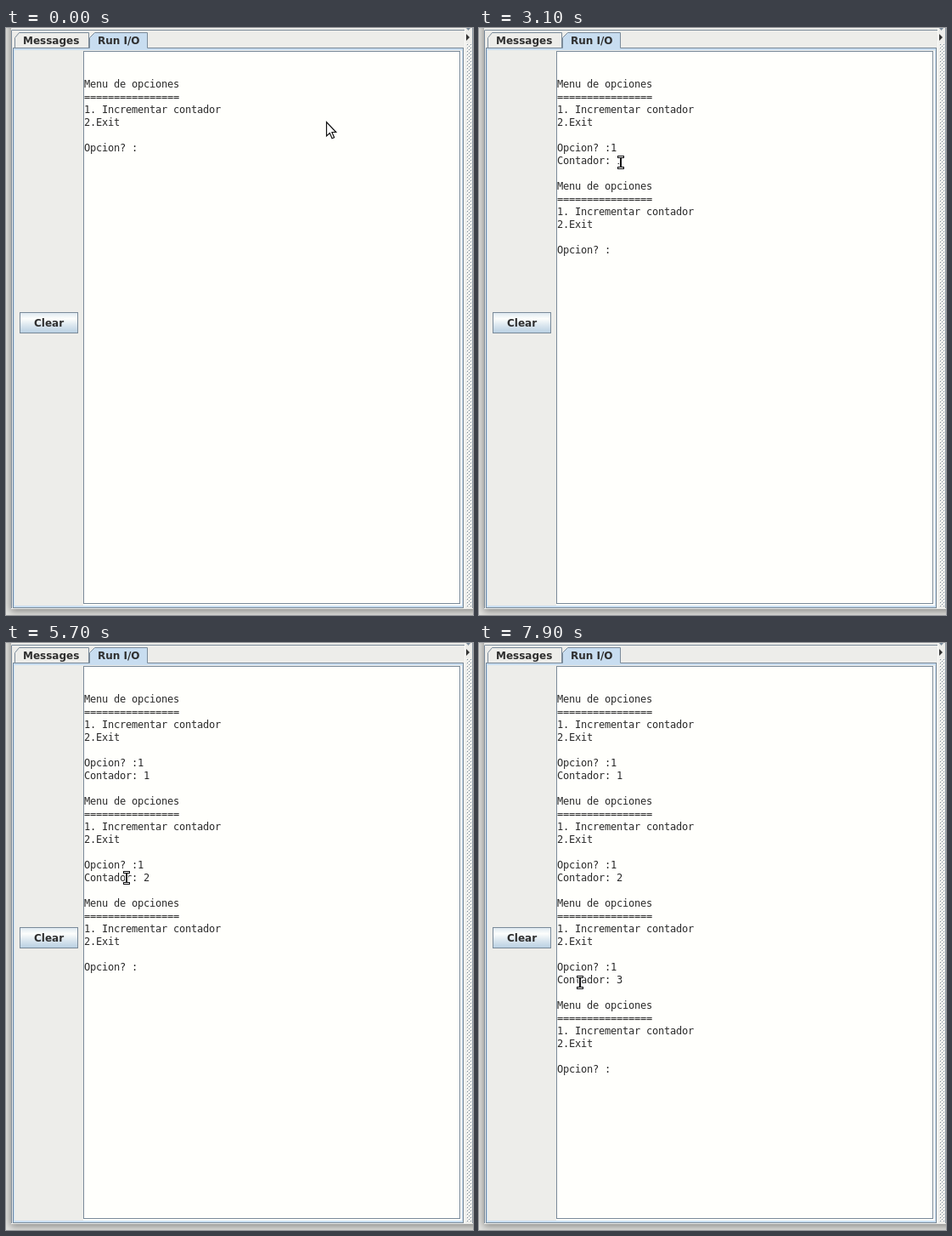
Write an HTML page that moves like this. It is 550 by 690 pixels and loops after 8000 ms.

```html
<!DOCTYPE html>
<html lang="es">
<head>
<meta charset="utf-8">
<title>Run I/O</title>
<style>
html, body { margin: 0; width: 100%; height: 100%; overflow: hidden; background: #e4e4e1; }
svg { display: block; width: 550px; height: 690px; }
.ui { font: bold 12px "DejaVu Sans", sans-serif; fill: #2f2f2f; }
.mono { font: 12px "DejaVu Sans Mono", monospace; fill: #292929; letter-spacing: calc(7px - 1ch); }
.edge { fill: none; stroke: #7a8a99; }
.crisp { shape-rendering: crispEdges; }
</style>
</head>
<body>
<svg viewBox="0 0 550 690">
  <defs>
    <linearGradient id="btn" x1="0" y1="0" x2="0" y2="1">
      <stop offset="0" stop-color="#dde8f0"/>
      <stop offset=".3" stop-color="#fdfefc"/>
      <stop offset=".6" stop-color="#dde8f0"/>
      <stop offset="1" stop-color="#b8cfe2"/>
    </linearGradient>
    <filter id="soft" filterUnits="userSpaceOnUse" x="-40" y="-80" width="680" height="800">
      <feGaussianBlur stdDeviation="5"/>
    </filter>
    <pattern id="bumps" x="542" y="18" width="4" height="4" patternUnits="userSpaceOnUse">
      <path d="M0 0h1v1h-1zM2 2h1v1h-1z" fill="#fff"/>
      <path d="M1 1h1v1h-1zM3 3h1v1h-1z" fill="#7a8a99"/>
    </pattern>
  </defs>

  <!-- window and its shadow -->
  <rect width="550" height="690" fill="#e4e4e1"/>
  <rect x="5" y="-60" width="620" height="746" fill="#000" opacity=".4" filter="url(#soft)"/>
  <rect x="6" width="544" height="683" fill="#ededea"/>
  <path d="M6.500 2.500H540M6.500 3V682" class="edge"/>

  <!-- tabs and their content frame -->
  <path d="M10.500 23V11.500L15.500 5.500H97.500V23" class="edge"/>
  <rect x="8.500" y="23.500" width="530" height="658" fill="#c8ddf0" stroke="#7a8a99"/>
  <path d="M98.500 25V11.500L104.500 5.500H166.500V25" fill="#c8ddf0"/>
  <path d="M98.500 23.500V11.500L104.500 5.500H166.500V23.500" class="edge"/>
  <path d="M8.500 24V681" stroke="#6d87a3"/>
  <rect x="10" y="26" width="527" height="653" fill="#ededea"/>
  <path d="M536 27V678H91" fill="none" stroke="#fffffc" stroke-width="2"/>
  <rect x="91.500" y="27.500" width="443" height="649" fill="#fffffc" stroke="#7a8a99"/>

  <!-- split divider -->
  <g class="crisp">
    <rect x="542" y="18" width="7" height="662" fill="url(#bumps)"/>
    <path d="M540.500 0V682" stroke="#fafaf8"/>
    <path d="M549.500 0V682" stroke="#8d98a3"/>
  </g>
  <path d="M542 7V15L546 11Z" fill="#333"/>
  <path d="M542 0H547L544.500 3Z" fill="#7a8a99"/>

  <rect x="16.500" y="334.500" width="68" height="24" fill="url(#btn)" stroke="#7a8a99"/>
  <g class="ui">
    <text x="20" y="19">Messages</text>
    <text x="108" y="19">Run I/O</text>
    <text x="33" y="351">Clear</text>
  </g>

  <g id="out" class="mono"></g>
  <rect id="caret" width="1" height="15" fill="#292929"/>
  <path id="arrow" d="M377.500 110.500V127L381.300 123.500L384 129.800L386.600 128.700L383.900 122.500H388.700Z" fill="#fff" stroke="#111" stroke-width="1.200"/>
  <g id="beam" class="crisp">
    <path d="M-5 -9H5V-4H2V4H5V9H-5V4H-2V-4H-5Z" fill="#fff"/>
    <path d="M-4 -8H4V-5H1V5H4V8H-4V5H-1V-5H-4Z" fill="#111"/>
    <path d="M-3 -7H3V-6H-3ZM-3 6H3V7H-3Z" fill="#fff"/>
  </g>
</svg>
<script>
const LOOP = 8000, STEP = 100, BLINK = 465, TYPE_LEAD = 300;
const CELL = 7, LINE = 15, LEFT = 92, TOP = 28;
const MENU = ["Menu de opciones", "=".repeat(16), "1. Incrementar contador", "2.Exit", "", "Opcion? :"];

const entered = [1700, 4900, 7000];
const typed = entered.map(t => t - TYPE_LEAD);
const caretResets = [535, ...typed, ...entered];

const BEAM_FROM = 400;
const home = [380, 113];
const moves = [
  { at: 2100, ms: 100, to: [312, 121] },
  { at: 2300, ms: 800, to: [167, 158] },
  { at: 3100, ms: 700, to: [190, 158] },
  { at: 3900, ms: 300, to: [191, 242] },
  { at: 4200, ms: 300, to: [205, 271] },
  { at: 4500, ms: 300, to: [177, 264] },
  { at: 5200, ms: 500, to: [142, 276] },
  { at: 6600, ms: 400, to: [201, 333] },
  { at: 7000, ms: 600, to: [116, 401] },
  { at: 7700, ms: 200, to: [119, 399] }
];

const $ = id => document.getElementById(id);
const show = (id, on) => { $(id).style.display = on ? "" : "none"; };
const count = (times, t) => times.filter(v => v <= t).length;

function pointer(t) {
  let pos = home;
  for (const { at, ms, to } of moves) {
    const k = Math.min(1, Math.max(0, (t - at) / ms));
    pos = pos.map((v, i) => v + (to[i] - v) * k);
  }
  return pos.map(Math.round);
}

function caretOn(t) {
  const since = t - Math.max(...caretResets.filter(r => r <= t));
  return Math.floor(since / BLINK) % 2 === 0;
}

function consoleLines(keys, rounds) {
  const lines = ["", "", ...MENU];
  for (let n = 1; n <= keys; n++) {
    lines[lines.length - 1] += "1";
    if (n <= rounds) lines.push("Contador: " + n, "", ...MENU);
  }
  return lines;
}

const drawLine = (s, row) => `<text x="${LEFT}" y="${TOP + row * LINE + 12}">${s}</text>`;

let shown = "";
function render(now) {
  const t = Math.floor((now % LOOP) / STEP) * STEP;
  const lines = consoleLines(count(typed, t), count(entered, t));
  const key = lines.join("\n");
  if (key !== shown) {
    $("out").innerHTML = lines.map(drawLine).join("");
    shown = key;
  }
  const row = lines.length - 1;
  $("caret").setAttribute("x", LEFT + lines[row].length * CELL);
  $("caret").setAttribute("y", TOP + row * LINE);
  show("caret", caretOn(t));
  show("arrow", t < BEAM_FROM);
  show("beam", t >= BEAM_FROM);
  $("beam").setAttribute("transform", `translate(${pointer(t)})`);
}

const start = performance.now();
function tick() {
  render(performance.now() - start);
  requestAnimationFrame(tick);
}
tick();
</script>
</body>
</html>
```
